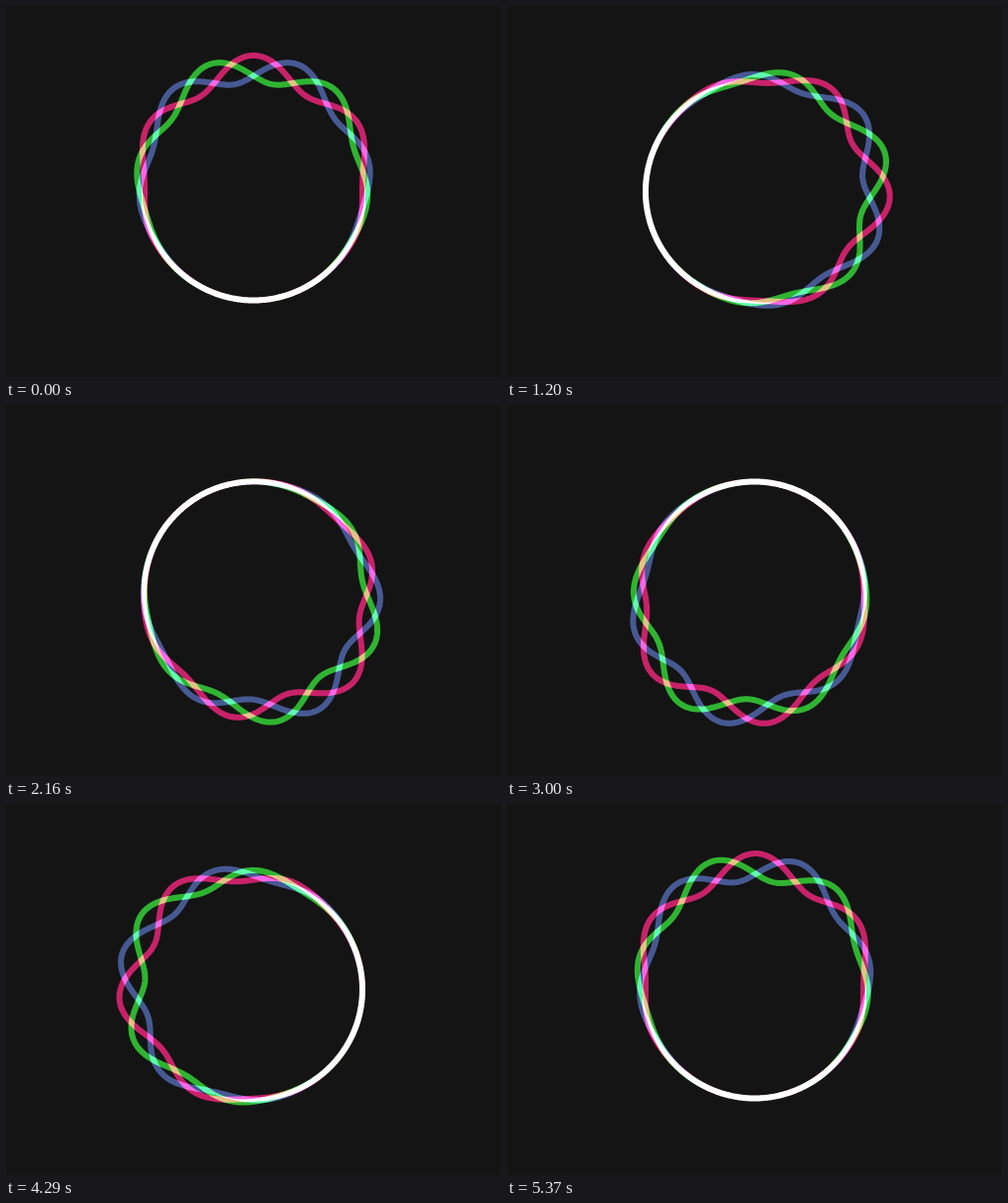
Animation of 500 by 375 pixels, one loop 5.4 s. Source, as an HTML page with a canvas:

```html
<!DOCTYPE html>
<html lang="en">
<head>
<meta charset="utf-8">
<title>Braided ring</title>
<style>
  html, body { margin: 0; width: 100%; height: 100%; overflow: hidden; background: #141414; }
  canvas { display: block; width: 500px; height: 375px; }
</style>
</head>
<body>
<canvas id="stage" width="500" height="375"></canvas>
<script>
const ctx = document.getElementById('stage').getContext('2d');
const TAU = Math.PI * 2;
const LOOP = 5400, STEP = 30;
const CX = 250, CY = 187.5, RADIUS = 110, SWELL = 27.5;
const WAVES = 6, DRIFT = 2, POINTS = 540;
// Light added to the background by each strand
const STRANDS = ['rgb(180,14,85)', 'rgb(27,160,29)', 'rgb(50,69,127)'];

// Angles run clockwise from the top; the swell travels once around per loop
// while the ripples drift back by two wavelengths.
function radiusAt(angle, phase, turn) {
  const swell = ((1 + Math.cos(angle - turn)) / 2) ** 2;
  const ripple = (1 + Math.cos(WAVES * angle + DRIFT * turn + phase)) / 2;
  return RADIUS + SWELL * swell * ripple;
}

function drawStrand(color, phase, turn) {
  ctx.beginPath();
  for (let i = 0; i < POINTS; i++) {
    const angle = TAU * i / POINTS;
    const r = radiusAt(angle, phase, turn);
    ctx.lineTo(CX + r * Math.sin(angle), CY - r * Math.cos(angle));
  }
  ctx.closePath();
  ctx.strokeStyle = color;
  ctx.stroke();
}

function draw(ms) {
  const turn = TAU * Math.floor((ms % LOOP) / STEP) * STEP / LOOP;
  ctx.globalCompositeOperation = 'source-over';
  ctx.fillStyle = '#141414';
  ctx.fillRect(0, 0, 500, 375);
  ctx.globalCompositeOperation = 'lighter';
  ctx.lineWidth = 6;
  ctx.lineJoin = 'round';
  STRANDS.forEach((color, i) => drawStrand(color, TAU * i / 3, turn));
}

const start = performance.now();
function tick() {
  draw(performance.now() - start);
  requestAnimationFrame(tick);
}
tick();
</script>
</body>
</html>
```
